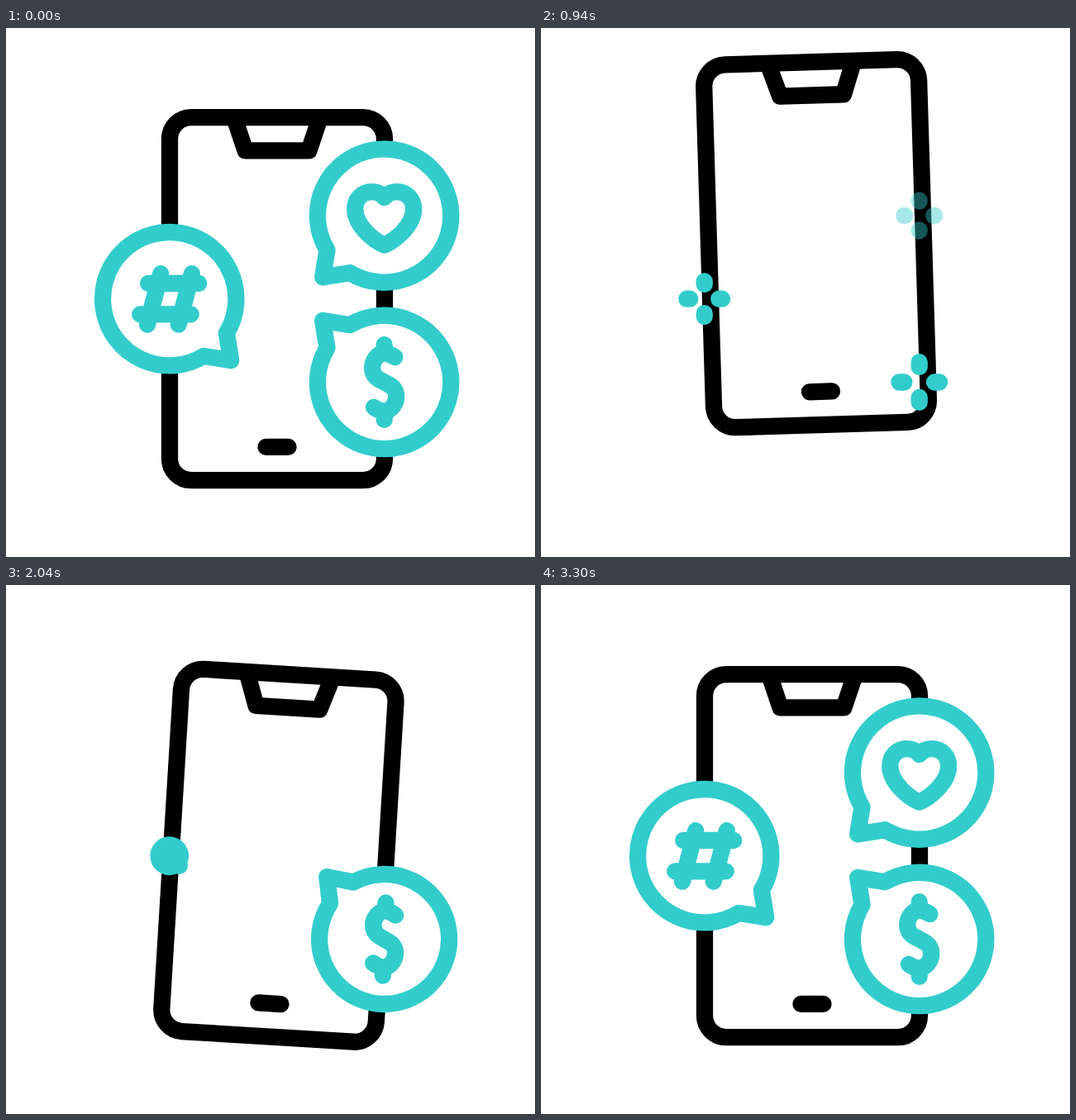
An HTML page that plays this animation: 640 by 640 pixels, repeating every 3400 ms.

```html
<!DOCTYPE html>
<html lang="en">
<head>
<meta charset="utf-8">
<title>Phone with chat bubbles</title>
<style>
  html, body { margin: 0; width: 100%; height: 100%; overflow: hidden; background: #fff; }
  svg { display: block; width: 640px; height: 640px; }
  path, rect { fill: none; stroke: #33cccc; stroke-width: 20.3; stroke-linecap: round; stroke-linejoin: round; }
  #ring, .icon { vector-effect: non-scaling-stroke; }
  #ring { fill: #fff; }
  #phone path, #phone rect { stroke: #000; }
  #phone .notch { stroke-linecap: butt; }
</style>
</head>
<body>
<svg viewBox="0 0 640 640">
  <defs>
    <path id="ring" d="M69.2 41.6L74.5 74.5L41.6 69.2A80.7 80.7 0 1 1 69.2 41.6Z"/>
  </defs>
  <g id="phone">
    <rect x="-130" y="-219.5" width="260" height="439" rx="26"/>
    <path class="notch" d="M-52 -219.5L-38.5 -179.3H38.5L52 -219.5"/>
    <path d="M-13.5 179.3H13.5"/>
  </g>
  <g id="hash">
    <use href="#ring"/>
    <path class="icon" d="M-25.5 -18.7H35.5M-35.5 18.7H26M-10.5 -30.5L-26.7 31M27.2 -30.5L11 31"/>
  </g>
  <g id="heart">
    <use href="#ring" transform="scale(-1 1)"/>
    <path class="icon" d="M0 -22C-4 -27 -9.5 -28.8 -15 -28.8C-27 -28.8 -35.4 -20 -35.4 -8C-35.4 13 -11 31 0 35.6C11 31 35.4 13 35.4 -8C35.4 -20 27 -28.8 15 -28.8C9.5 -28.8 4 -27 0 -22Z"/>
  </g>
  <g id="dollar">
    <use href="#ring" transform="scale(-1 -1)"/>
    <path class="icon" d="M0 -45.3V-35M0 35V45.3M12.7 -30.3C8 -33.5 4 -35 0 -35C-8 -35 -14.5 -26 -14.5 -17.5C-14.5 -6 -6 -3 0 0C6 3 14.5 6 14.5 17.5C14.5 26 8 35 0 35C-4 35 -8 33.5 -12.7 30.3"/>
  </g>
</svg>
<script>
const LOOP = 3400;
const EXIT_LAG = 112, ENTER_LAG = 197;
const BURST = 685, BURST_TIME = 430;

const progress = (t, from, to) => Math.min(1, Math.max(0, (t - from) / (to - from)));
const smooth = u => u * u * (3 - 2 * u);
const ease = (t, from, to) => smooth(progress(t, from, to));

// Swing through n half turns that swells and dies away.
function swing(t, from, to, n) {
  const u = progress(t, from, to);
  return Math.sqrt(Math.sin(Math.PI * u)) * Math.sin(n * Math.PI * u) || 0;
}

const phone = {
  el: document.getElementById("phone"),
  turn: t => -6 * swing(t, 540, 2360, 4),
  // sideways sway
  x: t => 6 * ease(t, 540, 880) - 12.5 * ease(t, 880, 1240)
        + 8.7 * ease(t, 1240, 1680) - 2.2 * ease(t, 1680, 3300),
  // crouch, leap, float down, settle
  y: t => 22 * progress(t, 0, 605) - 97.5 * progress(t, 605, 800) ** 2
        + 103 * progress(t, 800, 2500) - 31.5 * ease(t, 2500, 2890) + 4 * ease(t, 2890, 3300)
};

// Bubbles leave and come back one after another.
function makeBubble(id, x, y, leaveOrder, returnOrder) {
  const el = document.getElementById(id);
  const rays = document.createElementNS(el.namespaceURI, "path");
  rays.setAttribute("transform", `translate(${x} ${y})`);
  el.after(rays);
  return { el, rays, x, y, leave: leaveOrder * EXIT_LAG, back: (returnOrder - 2) * ENTER_LAG };
}
const bubbles = [
  makeBubble("hash", 197.7, 327.7, 1, 1),
  makeBubble("heart", 457.7, 227, 2, 2),
  makeBubble("dollar", 457.7, 428.5, 0, 0)
];

function drawBubble({ el, rays, x, y, leave, back }, t) {
  const tOut = t - leave, tIn = t - back;
  const size = tOut < BURST
    ? (1 + 0.13 * ease(tOut, 130, 620)) * (1 - ease(tOut, 620, BURST))
    : ease(tIn, 2160, 2465);
  const turn = 8.3 * swing(tIn, 2290, 2775, 3);
  el.style.display = size > 0.005 ? "" : "none";
  el.setAttribute("transform", `translate(${x} ${y}) rotate(${turn}) scale(${size})`);

  const u = progress(tOut, BURST, BURST + BURST_TIME);
  const p = 17.5 + 11.5 * u ** 5, q = 17.5 + 11.5 * u;
  rays.style.display = u > 0 && u < 1 ? "" : "none";
  rays.setAttribute("d", `M0 ${-p}V${-q}M0 ${p}V${q}M${-p} 0H${-q}M${p} 0H${q}`);
  rays.setAttribute("opacity", progress(tOut, BURST, BURST + 75));
}

const start = performance.now();
function draw() {
  const t = (performance.now() - start) % LOOP;
  phone.el.setAttribute("transform",
    `translate(${328 + phone.x(t)} ${327.6 + phone.y(t)}) rotate(${phone.turn(t)})`);
  bubbles.forEach(b => drawBubble(b, t));
  requestAnimationFrame(draw);
}
draw();
</script>
</body>
</html>
```
